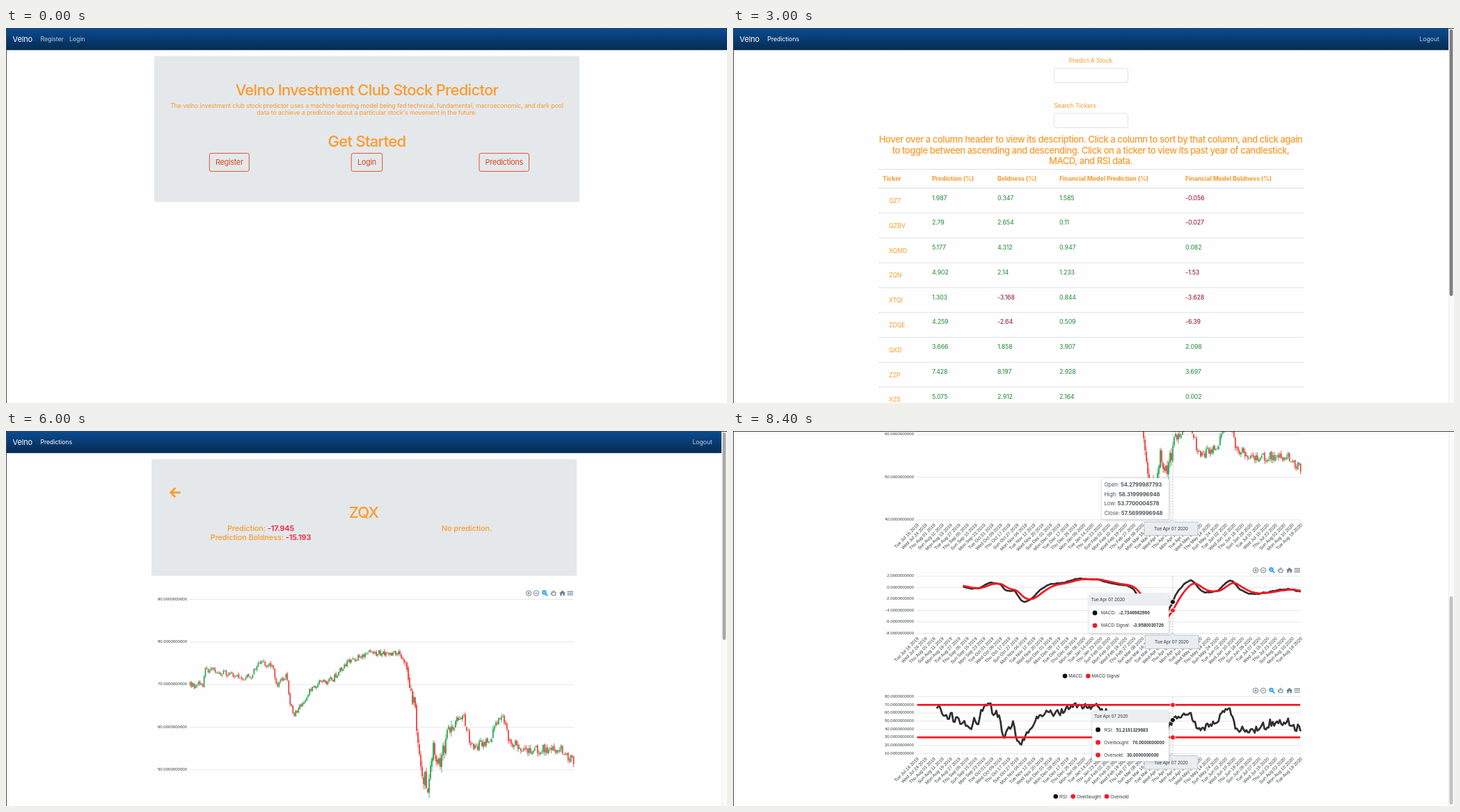
Recreate the animation shown at these times as an HTML page. Size 1036 px wide and 540 px high, loop 9000 ms.

```html
<!DOCTYPE html>
<html lang="en">
<head>
<meta charset="utf-8">
<title>Stock predictor tour</title>
<style>
html, body { margin: 0; width: 100%; height: 100%; overflow: hidden; background: #fefefe; }
svg { display: block; width: 1036px; height: 540px; }
text { font-family: Inter, "Open Sans", sans-serif; letter-spacing: -.012em; white-space: pre; }
text.head { letter-spacing: -.032em; }
text.chart { font-family: "Liberation Sans", Arial, sans-serif; letter-spacing: 0; }
.shadow { filter: drop-shadow(0 4.4px 4.4px rgba(0, 0, 0, .17)); }
.soft { filter: drop-shadow(1px 1px 2px rgba(0, 0, 0, .18)); }
</style>
</head>
<body>
<svg id="stage" viewBox="0 0 1036 540"></svg>
<script>
const ORANGE = '#fd9a2b', GREY = '#e4e8eb', RULE = '#dee2e6', INK = '#373d3f';
const RED = '#fb1722', BLACK = '#2f3032', UP = '#25a84f', DOWN = '#ee403d', TOOL = '#6e8192', ZOOM = '#1090f5';
const BRAND = 'Velno';

// ---- drawing helpers ----
const attrs = o => Object.entries(o).map(([k, v]) => `${k}="${v}"`).join(' ');
const text = (x, y, s, size = 8.8, fill = ORANGE, more = {}) =>
  `<text ${attrs({ x, y, 'font-size': size, fill, ...more })}>${s}</text>`;
const mid = (x, y, s, size, fill, more) => text(x, y, s, size, fill, { 'text-anchor': 'middle', ...more });
const heading = (x, y, s, size, fill = ORANGE) => mid(x, y, s, size, fill, { class: 'head', 'font-weight': 500 });
const note = (x, y, s, more, size = 6.6) => text(x, y, s, size, INK, { class: 'chart', ...more });
const box = (x, y, w, h, fill, rx = 0, more = {}) =>
  `<rect ${attrs({ x, y, width: w, height: h, fill, rx, ...more })}/>`;
const line = (d, stroke, width = 1, more = {}) =>
  `<path ${attrs({ d, fill: 'none', stroke, 'stroke-width': width, ...more })}/>`;
const dot = (x, y, r, fill, more = {}) => `<circle ${attrs({ cx: x, cy: y, r, fill, ...more })}/>`;
const group = (dy, content) => `<g transform="translate(0 ${dy})">${content}</g>`;
const field = (x, y, w) => box(x, y, w, 20.4, '#fff', 2.2, { stroke: '#ced4da', 'stroke-width': .7 });
const bold = (s, more = '') => `<tspan font-weight="700" ${more}>${s}</tspan>`;
const times = (n, draw) => Array.from({ length: n }, (_, i) => draw(i)).join('');

// ---- shared page parts ----
const edges = box(0, 0, 1036, 1, '#3c4248') + box(0, 0, 1, 540, '#4a4a4a');

function nav(width, links) {
  return box(1, 1, width - 1, 30.8, 'url(#navy)') + text(9.5, 20, BRAND, 11, '#fff') +
    links.map(([x, s, active]) => text(x, 19.3, s, 8.8, active ? '#fff' : '#bccbdc')).join('');
}
const guestNav = active => nav(1036, [[49.5, 'Register', active === 1], [91, 'Login', active === 2]]);
const memberNav = nav(1028, [[49.5, 'Predictions', true], [986.5, 'Logout', false]]);

const scrollbar = (y, h, fill) => box(1028, 0, 8, 540, '#fafafa') + box(1028, 0, .6, 540, '#e8e8e8') +
  box(1029.6, y, 4.8, h, fill, 2.4);

// ---- landing page ----
function landing() {
  const button = (x, w, s) => box(x, 180.4, w, 26, 'none', 2.6, { stroke: '#e0562c' }) +
    mid(x + w / 2, 197.4, s, 11, '#d94a1e', { class: 'head' });
  return guestNav() + box(213, 40.5, 611, 210, GREY, 2.6) +
    heading(518.5, 97, BRAND + ' Investment Club Stock Predictor', 22) +
    mid(518.5, 114.6, `The ${BRAND.toLowerCase()} investment club stock predictor uses a machine learning model being fed technical, fundamental, macroeconomic, and dark pool`) +
    mid(518.5, 125.2, "data to achieve a prediction about a particular stock's movement in the future.") +
    heading(518.5, 170.6, 'Get Started', 22) +
    button(292.3, 57, 'Register') + button(496.2, 44.5, 'Login') + button(680, 71.5, 'Predictions');
}

// ---- register and login forms ----
const keyIcon = y => dot(680, y, 3.1, 'none', { stroke: '#555', 'stroke-width': .9 }) +
  dot(680, y - .5, 1.2, '#555') + line(`M680 ${y}v3.6`, '#555', 1.2);
const cardIcon = box(671.5, 96.2, 5, 6.8, 'none', .8, { stroke: '#555', 'stroke-width': .8 }) +
  dot(674, 98.6, .9, '#555') + box(672.7, 100.2, 2.6, 1.4, '#555');
const dotsIcon = box(675.5, 95.6, 9.3, 8.2, '#a5a5a5', 1.2) + times(3, i => dot(677.8 + 2.3 * i, 99.7, .7, '#fff'));

function form(active, title, names, buttonWidth, icons) {
  const pitch = 47.35, buttonY = 71.6 + names.length * pitch;
  return guestNav(active) +
    box(342, 40.3, 352.5, buttonY - 10.5, 'url(#navy)', 4.5, { class: 'shadow' }) +
    heading(518.3, 64, title, 15.4, '#fff') +
    names.map((s, i) => group(pitch * i, text(351, 81.4, s, 8.8, '#fff') + field(351, 89.6, 334.5))).join('') +
    box(351, buttonY, buttonWidth, 20.6, 'url(#rust)', 2.2) +
    mid(351 + buttonWidth / 2, buttonY + 13.5, title, 8.8, '#c9b3ad') + icons;
}

// ---- predictions table ----
const columns = { 'Ticker': 215, 'Prediction (%)': 286, 'Boldness (%)': 380,
  'Financial Model Prediction (%)': 469, 'Financial Model Boldness (%)': 650 };
const rows = `QZT 1.987 0.347 1.585 -0.056
QZBV 2.79 2.654 0.11 -0.027
XQMD 5.177 4.312 0.947 0.082
ZQN 4.902 2.14 1.233 -1.53
XTQI 1.303 -3.168 0.844 -3.628
ZDQE 4.259 -2.64 0.509 -6.39
QXD 3.666 1.858 3.907 2.098
ZZP 7.428 8.197 2.928 3.697
XZS 5.075 2.912 2.164 0.002
QFZ 16.876 20.58`.split('\n').map(row => row.split(' '));

function table() {
  const left = Object.values(columns), last = rows.length - 1;
  const header = Object.entries(columns)
    .map(([s, x]) => text(x, 220.2, s, 8.8, ORANGE, { 'font-weight': 700 })).join('');
  const body = rows.map(([ticker, ...values], i) => group(35.77 * i,
    text(224, 252.2, ticker) + (i < last ? line('M209 266.6H820.5', RULE) : '') +
    values.map((v, c) => text(left[c + 1], 247.6, v, 8.8,
      v[0] === '-' ? '#8c1123' : i === last ? '#30b445' : '#208a35')).join(''))).join('');
  return line('M209 203.5H820.5', RULE) + header + line('M209 230.6H820.5', RULE, 1.3) + body;
}

function predictions() {
  const help = ['Hover over a column header to view its description. Click a column to sort by that column, and click again',
    'to toggle between ascending and descending. Click on a ticker to view its past year of candlestick,',
    'MACD, and RSI data.'];
  return mid(514, 50, 'Predict A Stock') + field(461.3, 58, 106) +
    text(461, 115.2, 'Search Tickers') + field(461.3, 123, 106) +
    help.map((s, i) => heading(514, 165.2 + 15.5 * i, s, 13)).join('') +
    table() + memberNav + scrollbar(2, 384, '#7d7d7d');
}

function pager() {
  const button = (x, w, s, opacity) => `<g opacity="${opacity}">` +
    box(x, 466.4, w, 21, 'url(#flame)', 2.2) + mid(x + w / 2, 480.2, s, 8.8, '#fff') + '</g>';
  return group(-213.6, table()) + box(209, 384, 611, 138.3, GREY) +
    text(275, 433.8, 'Page ' + bold('1 of 51'), 15.4, ORANGE, { class: 'head', 'font-weight': 500 }) +
    mid(515, 429, 'Go To Page') + field(425.7, 437, 180.6) + text(431.5, 450.4, '1') +
    field(616, 419, 194.5) + text(623.7, 432.6, 'Show 10') + line('M803.6 428.4l2 2 2-2', '#444', 1.1) +
    button(279, 25.5, '&lt;&lt;', .62) + button(430, 20, '&lt;', .62) +
    button(578, 20, '&gt;', 1) + button(724, 25, '&gt;&gt;', 1) + scrollbar(155, 383, '#c1c1c1');
}

// ---- price history and the indicators computed from it ----
const DAYS = 277, LEFT = 264.6, DAY = 551 / (DAYS - 1);
const dayX = i => LEFT + i * DAY;
const seeded = seed => () => (seed = seed * 16807 % 2147483647) / 2147483647;

// Turning points of the price on the page; daily noise fills in between.
const trend = ('265,366 283,364 286,343 326,350 350,356 364,331 384,340 389,365 404,352 407,388 414,411 427,390 440,368 ' +
  '474,354 487,335 522,319 565,320 573,338 580,368 588,402 597,490 607,512 614,452 624,486 634,428 658,412 668,455 ' +
  '692,450 713,405 722,445 740,460 797,458 816,476').split(' ').map(p => p.split(',').map(Number));

function priceHistory() {
  const random = seeded(71);
  let open = trend[0][1];
  return Array.from({ length: DAYS }, (_, i) => {
    const x = dayX(i), k = Math.max(1, trend.findIndex(p => p[0] >= x));
    const [[x0, y0], [x1, y1]] = trend.slice(k - 1, k + 1);
    const swing = x < 573 ? 4.5 : x < 640 ? 12 : 7;
    const close = y0 + (y1 - y0) * (x - x0) / (x1 - x0) + (random() * 2 - 1) * swing;
    const day = { x, open, close,
      high: Math.min(open, close) - random() * swing * .7, low: Math.max(open, close) + random() * swing * .7 };
    open = close + (random() - .5) * swing * .5;
    return day;
  });
}
const history = priceHistory();
const closes = history.map(day => 90 - (day.close - 242.5) / 6.135);

const smooth = (values, weight) => {
  let mean = values[0];
  return values.map(v => mean += (v - mean) * weight);
};
const ema = (values, days) => smooth(values, 2 / (days + 1));
const slow = ema(closes, 26);
const macd = ema(closes, 12).map((v, i) => v - slow[i]);
const signal = ema(macd, 9);
const changes = closes.map((v, i) => i ? v - closes[i - 1] : 0);
const gains = smooth(changes.map(c => Math.max(c, 0)), 1 / 14);
const moves = smooth(changes.map(Math.abs), 1 / 14);
const rsi = gains.map((g, i) => 100 * g / (moves[i] || 1));

// ---- charts ----
// Every sixth trading day is labelled; Fridays carry the date of the following Sunday.
function axisDates() {
  const holidays = '2019-09-02 2019-11-28 2019-12-25 2020-01-01 2020-01-20 2020-02-17 2020-04-10 2020-05-25 2020-07-03';
  const labels = [], day = new Date(Date.UTC(2019, 6, 16));
  for (let n = 0; n < DAYS; day.setUTCDate(day.getUTCDate() + 1)) {
    const week = day.getUTCDay();
    if (week % 6 === 0 || holidays.includes(day.toISOString().slice(0, 10))) continue;
    if (n++ % 6) continue;
    const shown = new Date(+day + (week === 5 ? 2 * 864e5 : 0)).toUTCString();
    labels.push(`${shown.slice(0, 3)} ${shown.slice(8, 11)} ${shown.slice(5, 7)} ${shown.slice(12, 16)}`);
  }
  return labels;
}
const dates = axisDates();
const dateAxis = y => dates.map((s, i) => {
  const x = dayX(6 * i);
  return line(`M${x} ${y}v3`, '#e0e0e0', .6) +
    `<g transform="translate(${x + 2.8} ${y + 8}) rotate(-45)">${note(0, 0, s, { 'text-anchor': 'end' })}</g>`;
}).join('');

const valueAxis = (top, gap, first, step, count) => times(count, i =>
  line(`M264 ${top + gap * i}H816`, '#e2e2e2', .8) +
  note(260, top + gap * i + 1.2, (first - step * i).toFixed(10), { 'text-anchor': 'end' }, 6.05));

const toolbar = y => group(y,
  [751, 762].map(x => dot(x, 0, 3.7, 'none', { stroke: TOOL }) + line(`M${x - 2} 0h4`, TOOL)).join('') +
  line('M751-2v4', TOOL) + dot(773.4, -1, 2.5, 'none', { stroke: ZOOM, 'stroke-width': 1.3 }) +
  line('M775.3 1l3 3', ZOOM, 1.6) + line('M772-1h2.8M773.4-2.4v2.8', ZOOM, .8) +
  line('M784.6 1v-3.4M786.4 0v-4M788.2 0v-3.4M790 1v-2.6M782.7-.4l2 3.4h4.8l.6-2.6', TOOL, 1.1) +
  `<path d="M794.8 .3L799.5-4l4.7 4.3h-1.4v3.5h-2.3V1h-2v2.8h-2.3V.3z" fill="${TOOL}"/>` +
  line('M806.5-2.4h8.4M806.5 0h8.4M806.5 2.4h8.4', TOOL, 1.1));

const candle = ({ x, open, close, high, low }) => {
  const color = close < open ? UP : DOWN;
  return line(`M${x} ${high}V${low}`, color, .8) +
    box(x - .85, Math.min(open, close), 1.7, Math.max(.8, Math.abs(close - open)), color);
};
const priceChart = toolbar(233.5) + valueAxis(242.5, 61.35, 90, 10, 6) + history.map(candle).join('') + dateAxis(549.3);

function stock() {
  const stat = (y, name, value) => mid(366, y, name + ': ' +
    `<tspan fill="#f3203c" font-weight="600">${value}</tspan>`, 11, ORANGE, { 'font-weight': 500 });
  return priceChart + memberNav + box(209, 40.5, 611, 168, GREY, 2.6) +
    line('M250.6 88.6H237M243.3 82l-6.6 6.6 6.6 6.6', ORANGE, 2.7) + heading(514, 124.7, 'ZQX', 22) +
    stat(144.2, 'Prediction', '-17.945') + stat(157.3, 'Prediction Boldness', '-15.193') +
    mid(662, 144.2, 'No prediction.', 11, ORANGE, { 'font-weight': 500 }) + scrollbar(2, 299, '#a8a8a8');
}

const HOVER_DAY = 184, HOVER = dayX(HOVER_DAY), HOVER_DATE = 'Tue Apr 07 2020';
const macdY = v => 225.5 - 8.25 * v, rsiY = v => 476.3 - 1.17 * v;
const curve = (values, toY, firstDay, color) => line('M' + values
  .map((v, i) => `${dayX(i)} ${toY(v)}`).slice(firstDay).join(' '), color, 2.7, { 'stroke-linejoin': 'round' });
const level = (y, color) => line(`M${LEFT} ${y}H815`, color, 2.7);
const marker = (y, color) => dot(HOVER, y, 3.5, color, { stroke: '#fff', 'stroke-width': .9 });
const crosshair = (y0, y1) => line(`M${HOVER} ${y0}V${y1}`, '#b6b6b6', .8, { 'stroke-dasharray': '2 2' });
const dateFlag = (x, y) => line(`M${x} ${y}h36l3.5-3 3.5 3h34v19.4h-77z`, '#a5b4bc', .7, { fill: '#e9edf0' }) +
  note(x + 38.3, y + 12, HOVER_DATE, { 'text-anchor': 'middle' });
const legend = (y, items) => items.map(([x, s, color]) =>
  dot(x, y, 3.3, color) + note(x + 5.3, y + 2.3, s)).join('');
const panel = (x, y, h) =>
  box(x, y, 626 - x, h, '#fff', 2.7, { class: 'soft', stroke: '#e3e3e3', 'stroke-width': .6 });

function tooltip(x, y, h, items) {
  return panel(x, y, h) + box(x + .3, y + .3, 625.4 - x, 16, '#eceff1', 2) +
    line(`M${x} ${y + 16.3}H626`, '#dde1e4', .7) + note(x + 3, y + 10.5, HOVER_DATE) +
    items.map(([name, value, color], i) => group(y + 18.2 * i, dot(x + 8.5, 27.4, 3.4, color) +
      note(x + 17.3, 29.8, `${name}: ` + bold(value, 'dx="2.6"')))).join('');
}

function indicators() {
  const quote = { Open: '54.2799987793', High: '58.3199996948', Low: '53.7700004578', Close: '57.5699996948' };
  const overbought = rsiY(70), oversold = rsiY(30);
  return group(-421.4, priceChart) + crosshair(0, 128) + panel(529.5, 68, 59) +
    Object.entries(quote).map(([name, value], i) =>
      text(533.5, 79.8 + 13.75 * i, `${name}: ` + bold(value), 7.7, '#50565a')).join('') +
    dateFlag(591, 131) +

    toolbar(200.5) + valueAxis(209, 16.5, 2, 2, 6) + dateAxis(291.5) + crosshair(209, 291.5) +
    curve(macd, macdY, 33, BLACK) + curve(signal, macdY, 33, RED) +
    marker(macdY(macd[HOVER_DAY]), '#111') + marker(macdY(signal[HOVER_DAY]), RED) +
    tooltip(511.5, 234.5, 56.5, [['MACD', '-2.7346982960', '#111'], ['MACD Signal', '-3.9580030726', RED]]) +
    dateFlag(592, 294) + legend(352.7, [[477, 'MACD', '#111'], [510.3, 'MACD Signal', RED]]) +

    toolbar(373.8) + valueAxis(382.7, 11.7, 80, 10, 8) + dateAxis(464.6) + crosshair(382.7, 464.6) +
    curve(rsi, rsiY, 14, BLACK) + level(overbought, RED) + level(oversold, RED) +
    marker(overbought, RED) + marker(rsiY(rsi[HOVER_DAY]), '#111') + marker(oversold, RED) + dateFlag(591, 467.6) +
    tooltip(516, 402.8, 72.5, [['RSI', '51.2191329683', '#111'], ['Overbought', '70.0000000000', RED], ['Oversold', '30.0000000000', RED]]) +
    legend(526.2, [[463.7, 'RSI', '#111'], [488.6, 'Overbought', RED], [537, 'Oversold', RED]]) +
    scrollbar(238, 300, '#c1c1c1');
}

// ---- timeline: [start in ms, picture] ----
const scenes = [
  [0, landing()],
  [1000, form(1, 'Register', ['First Name', 'Last Name', 'Email', 'Password'], 47, cardIcon + keyIcon(241.6))],
  [2000, form(2, 'Login', ['Email', 'Password'], 36, dotsIcon + keyIcon(147))],
  [3000, predictions()],
  [5000, pager()],
  [6000, stock()],
  [7500, indicators()],
];
const LOOP = 9000;

const gradient = (id, from, to) => `<linearGradient id="${id}" x2="0" y2="1">` +
  `<stop stop-color="${from}"/><stop offset="1" stop-color="${to}"/></linearGradient>`;
const stage = document.getElementById('stage');
stage.innerHTML = gradient('navy', '#0a4b91', '#052b52') + gradient('rust', '#ad5133', '#93442f') +
  gradient('flame', '#f65a1c', '#c63d0e') +
  scenes.map(([, picture]) => `<g display="none">${picture}</g>`).join('') + edges;
const layers = [...stage.children].filter(node => node.getAttribute('display') === 'none');

function render() {
  const time = performance.now() % LOOP;
  const current = scenes.findLastIndex(([start]) => start <= time);
  layers.forEach((layer, i) => layer.setAttribute('display', i === current ? 'inline' : 'none'));
  requestAnimationFrame(render);
}
render();
</script>
</body>
</html>
```
